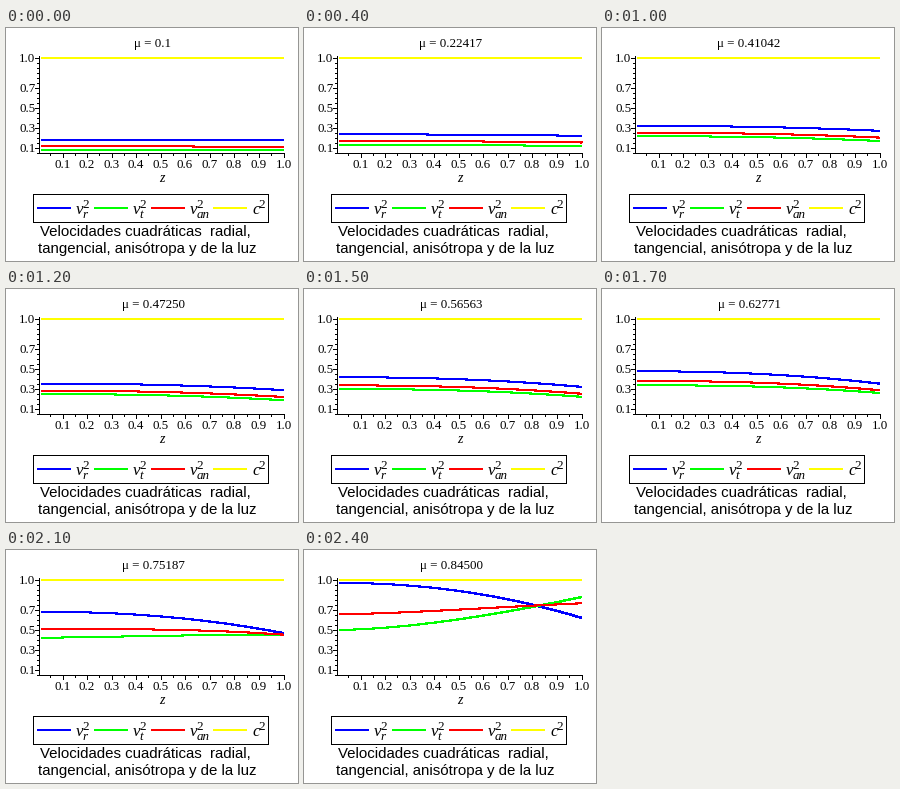
A matplotlib script for the animation above (2500 ms loop, 292 by 233 pixels).

```python
import numpy as np
import matplotlib.pyplot as plt
from matplotlib.animation import FuncAnimation
from matplotlib.patches import Rectangle

W, H, DPI = 292, 233, 100
PX = 72 / DPI  # points per pixel
FRAMES, INTERVAL = 25, 100
MU_FIRST, MU_LAST = .1, .845
LEFT, BASE = 33, 125
SERIF, SANS = "Liberation Serif", "Liberation Sans"
BLUE, GREEN, RED, YELLOW = "#0000ff", "#00ff00", "#ff0000", "#ffff00"

# Offset, growth, growth power and edge swing of each squared speed
SPEEDS = {
    BLUE: (.140, 1.40, 6.5, -.66),
    GREEN: (.036, .20, 4, 2.44),
    RED: (.073, .61, 6, 1.44),
}


def speed(mu, z, offset, growth, power, swing):
    centre = offset + .43 * mu + growth * mu**power
    return centre + swing * mu**9 * z**1.85 - .29 * mu**2 * z**2.3


def to_x(z):
    return 32.5 + 245.5 * z


def to_y(v):
    return 130 - 100 * v


fig = plt.figure(figsize=(W / DPI, H / DPI), dpi=DPI, facecolor="white")
ax = fig.add_axes([0, 0, 1, 1])
ax.set(xlim=(0, W), ylim=(H, 0))
ax.axis("off")


def line(xs, ys, color="black", width=1):
    return ax.plot(xs, ys, color=color, lw=width * PX, antialiased=False,
                   snap=True, solid_capstyle="butt")[0]


def text(x, y, s, size=13, family=SERIF, ha="left", style="normal"):
    return ax.text(x, y, s, fontsize=size * PX, family=family, ha=ha,
                   va="baseline", style=style)


def draw_axes():
    line([LEFT, LEFT], [28, BASE])
    line([LEFT, 278], [BASE, BASE])
    for i in range(1, 21):
        value = i / 20
        x, y = np.floor(to_x(value)), to_y(value)
        x_major = i % 2 == 0
        y_major = i in (2, 6, 10, 14, 20)
        line([x, x], [BASE, BASE + (4 if x_major else 2)])
        line([LEFT - (4 if y_major else 2), LEFT], [y, y])
        if x_major:
            text(x, 140, f"{value:.1f}", ha="center")
        if y_major:
            text(29.5, y + 4.5, f"{value:.1f}", ha="right")
    text(156, 154, "z", 14, ha="center", style="italic")


def draw_legend():
    ax.add_patch(Rectangle((27, 166), 235, 28, fill=False, lw=PX,
                           ec="black", antialiased=False, snap=True))
    entries = [(31, BLUE, "v", "r"), (88, GREEN, "v", "t"),
               (145, RED, "v", "an"), (207, YELLOW, "c", "")]
    for x, color, name, sub in entries:
        line([x, x + 34], [180, 180], color, 2)
        text(x + 39, 186, name, 17, style="italic")
        text(x + 45.5, 180, "2", 13)
        text(x + 45.5, 190, sub, 13, style="italic")


draw_axes()
draw_legend()
text(34, 208, "Velocidades cuadráticas  radial,", 15, SANS)
text(32.5, 225, "tangencial, anisótropa y de la luz", 15, SANS)
title = text(147, 19, "", ha="center")

xs = np.arange(35, 279)
z = (xs - to_x(0)) / (to_x(1) - to_x(0))
curves = {color: line([], [], color, 2) for color in SPEEDS}
line([35, 278], [to_y(1)] * 2, YELLOW, 2)


def update(step):
    mu = MU_FIRST + (MU_LAST - MU_FIRST) * step / (FRAMES - 1)
    title.set_text(f"μ = {mu:.5f}" if step else f"μ = {mu:.1f}")
    for color, curve in curves.items():
        curve.set_data(xs, to_y(speed(mu, z, *SPEEDS[color])))
    return [title, *curves.values()]


anim = FuncAnimation(fig, update, frames=FRAMES, interval=INTERVAL,
                     repeat=True, blit=False)
plt.show()
```
